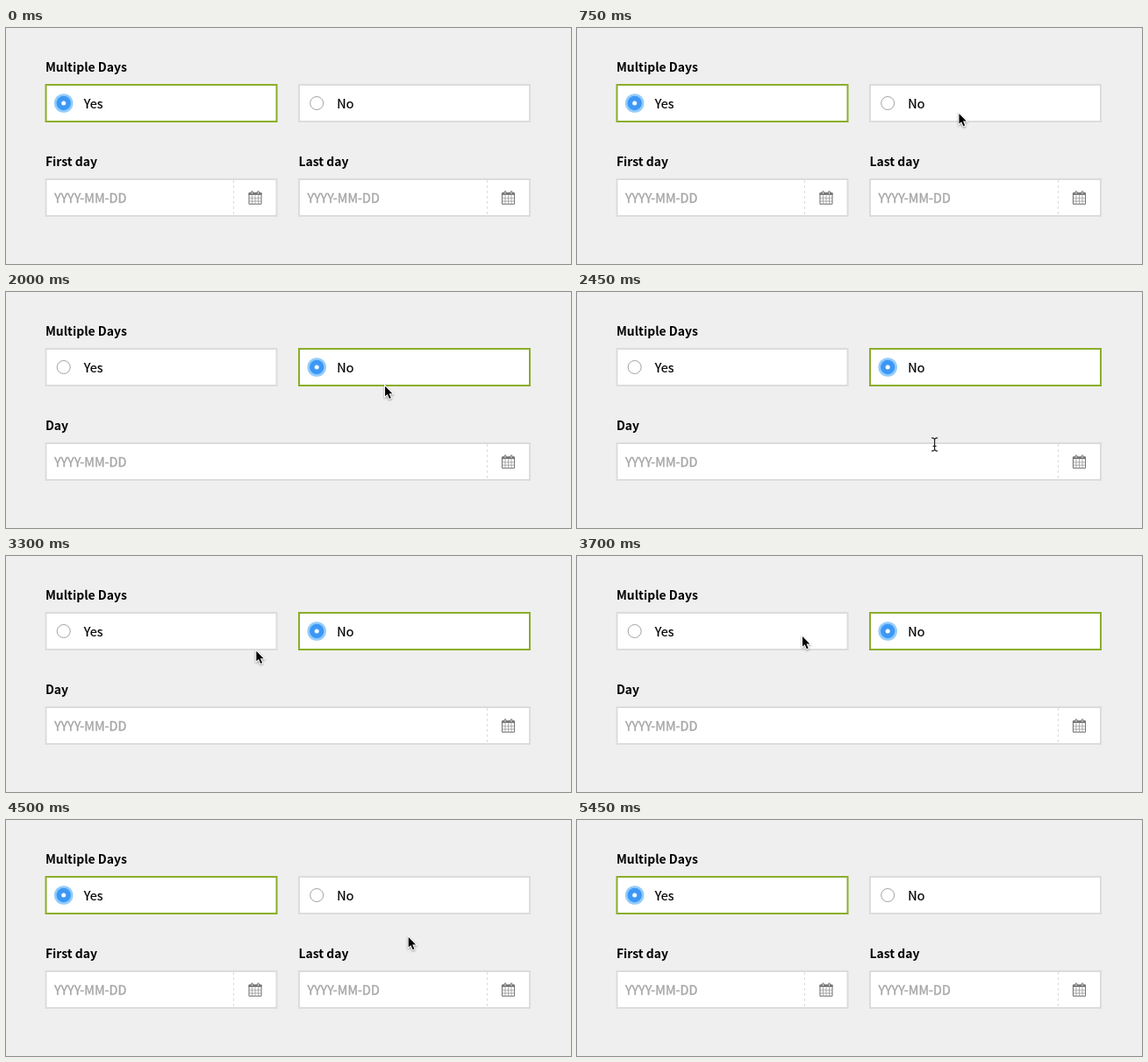
Write an HTML page that moves like this. It is 644 px wide and 270 px high and loops after 5500 ms.

```html
<!DOCTYPE html>
<html lang="en">
<head>
<meta charset="utf-8">
<title>Multiple days form</title>
<style>
  html, body { margin: 0; width: 100%; height: 100%; overflow: hidden; background: #efefef; }
  svg { display: block; width: 644px; height: 270px; }
  text {
    font: 400 14.35px "Noto Sans CJK SC", "Noto Sans CJK JP", "Noto Sans CJK", "Noto Sans", sans-serif;
    stroke: #000; stroke-width: .2px;
  }
  .label { font-weight: 600; font-size: 13.95px; stroke: none; }
  .hint { fill: #a6a6a6; stroke: #a6a6a6; stroke-width: .4px; }
  .box { fill: #fff; stroke: #dcdcdc; stroke-width: 2; }
  .box.on { stroke: #8bad2b; }
  .divider { stroke: #dcdcdc; stroke-dasharray: 3; }
  #arrow { filter: drop-shadow(0 1px 1px #0006); }
</style>
</head>
<body>
<svg viewBox="0 0 644 270">
  <defs>
    <g id="calendar" fill="none" stroke="#777" stroke-linecap="round">
      <rect x="1" y="2.7" width="14" height="12.8" rx=".8" fill="#fff" stroke-width="1.1"/>
      <path d="M1.5 3.7h13" stroke-width="2.4"/>
      <path d="M1.5 8.8h13M1.5 12.1h13M4.5 5.5v10M8 5.5v10M11.5 5.5v10" stroke="#999" stroke-width=".8"/>
      <path d="M4.5 1.7v1.8M11.5 1.7v1.8" stroke-width="3"/>
      <path d="M4.5 1.7v1.8M11.5 1.7v1.8" stroke="#ddd" stroke-width="1"/>
    </g>
    <circle id="radio-off" r="7.5" fill="#fff" stroke="#a2a2a2"/>
    <g id="radio-on">
      <circle r="10.8" fill="#94ccfa"/>
      <circle r="8.2" fill="#3c98f5"/>
      <circle r="2.5" fill="#fff"/>
    </g>
  </defs>
  <text class="label" x="44.9" y="50">Multiple Days</text>
  <g id="form-yes"></g>
  <g id="form-no"></g>
  <path id="arrow" d="M.5 1V12.6L3.2 10.2 5.4 15.2 7.2 14.4 5 9.5H8.8Z"
        fill="#000" stroke="#fff" stroke-width="2" paint-order="stroke"/>
  <path id="beam" d="M-3.5-7.5Q0-7.5 0-5V5Q0 7.5-3.5 7.5M3.5-7.5Q0-7.5 0-5V5Q0 7.5 3.5 7.5M-2 2h4"
        fill="none" stroke="#222" stroke-width="1.2"/>
</svg>
<script>
  const DURATION = 5500, STEP = 50;
  const PICK_NO = 1000, PICK_YES = 3850;
  const LEFT = 44.5, RIGHT = 333, COLUMN = 265;

  const easeOut = u => 1 - (1 - u) ** 2;
  const easeInOut = u => u * u * (3 - 2 * u);
  const outside = { x: 640, y: 200 };
  const glides = [
    { from: 250, to: 700, x: 435, y: 97, ease: easeOut },
    { from: 1850, to: 2550, x: 406, y: 179, ease: easeInOut },
    { from: 2950, to: 3570, x: 256.5, y: 91, ease: easeOut },
    { from: 4250, to: 4750, x: 660, y: 175, ease: easeInOut }
  ];
  const byId = id => document.getElementById(id);

  const box = (x, y, width, on) =>
    `<rect class="box${on ? ' on' : ''}" x="${x + 1}" y="${y + 1}" width="${width - 2}" height="42"/>`;

  const option = (x, name, on) => box(x, 64, COLUMN, on) +
    `<use href="#radio-${on ? 'on' : 'off'}" x="${x + 21.2}" y="86"/>
     <text x="${x + 44.3}" y="92">${name}</text>`;

  const dateField = (x, width, label) => {
    const end = x + width;
    return `<text class="label" x="${x + .4}" y="158">${label}</text>` + box(x, 172, width) +
      `<path class="divider" d="M${Math.floor(end) - 49.5} 174v40"/>
       <text class="hint" x="${x + 10.4}" y="200">YYYY-MM-DD</text>
       <use href="#calendar" x="${end - 33.5}" y="186"/>`;
  };

  const options = yes => option(LEFT, 'Yes', yes) + option(RIGHT, 'No', !yes);
  byId('form-yes').innerHTML = options(true) +
    dateField(LEFT, COLUMN, 'First day') + dateField(RIGHT, COLUMN, 'Last day');
  byId('form-no').innerHTML = options(false) + dateField(LEFT, RIGHT + COLUMN - LEFT, 'Day');

  // The pointer rests where its latest glide ended.
  function pointerAt(t) {
    let { x, y } = outside;
    for (const glide of glides) {
      const u = Math.min(1, Math.max(0, (t - glide.from) / (glide.to - glide.from)));
      const k = glide.ease(u);
      x += (glide.x - x) * k;
      y += (glide.y - y) * k;
    }
    return { x, y };
  }

  const show = (id, visible) => byId(id).setAttribute('visibility', visible ? 'visible' : 'hidden');

  function draw(t) {
    const no = t >= PICK_NO && t < PICK_YES;
    const { x, y } = pointerAt(t);
    const present = t > glides[0].from && t < glides.at(-1).to;
    const overField = no && y > 172 && x < 548;
    show('form-yes', !no);
    show('form-no', no);
    show('arrow', present && !overField);
    show('beam', present && overField);
    byId(overField ? 'beam' : 'arrow').setAttribute('transform', `translate(${x} ${y})`);
  }

  let start;
  function tick(now) {
    start ??= now;
    draw(Math.floor((now - start) % DURATION / STEP) * STEP);
    requestAnimationFrame(tick);
  }
  draw(0);
  requestAnimationFrame(tick);
</script>
</body>
</html>
```
